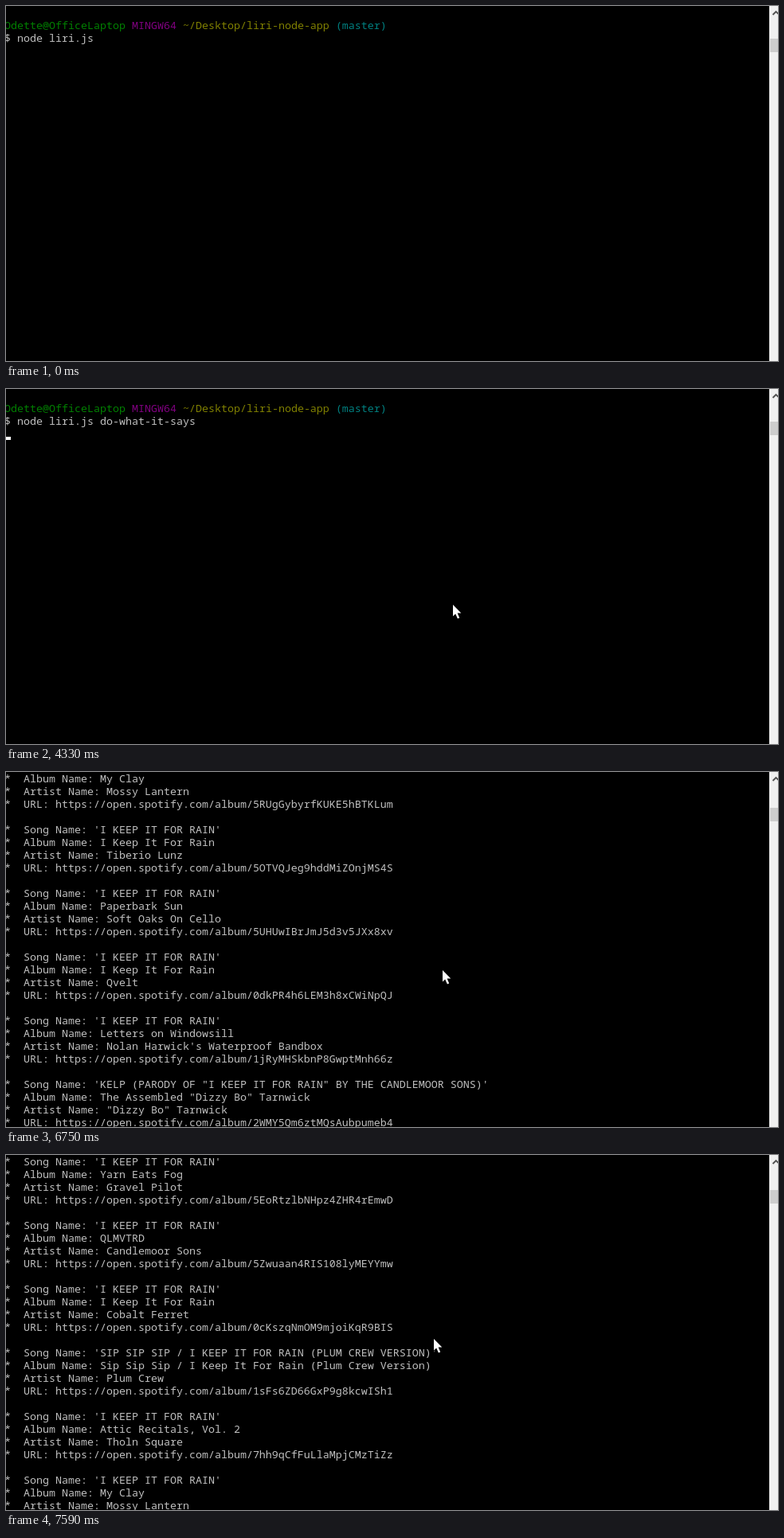
These frames come from a looping animation (969 by 446 pixels, 7990 ms). An HTML page:

```html
<!DOCTYPE html>
<html lang="en">
<head>
<meta charset="utf-8">
<title>Terminal search</title>
<style>
html, body { margin: 0; width: 100%; height: 100%; overflow: hidden; background: #000; }
#stage { position: relative; width: 969px; height: 446px; overflow: hidden; background: #000; }
#stage > * { position: absolute; }
pre {
  margin: 0; left: -2px; top: 0; color: #c0c0c0; white-space: pre;
  font: 13.333px/16px "Noto Sans Mono", "DejaVu Sans Mono", monospace;
  font-variant-ligatures: none;
}
.user { color: #008000; }
.sys { color: #800080; }
.path { color: #808000; }
.branch { color: #008080; }
.end { display: inline-block; height: 16px; color: #00f; background: #c0c0c0; }
#caret { left: -2px; top: 12px; width: 8px; height: 4px; background: #fff; }
#bar { left: 958px; top: 0; width: 11px; height: 446px; background: #f0f0f0; }
#thumb { left: 959px; top: 0; width: 10px; height: 17px; background: #cdcdcd; }
#arrow { left: 958px; top: 0; }
#mouse { left: 0; top: 0; overflow: visible; }

#shell, #log, #arg, #caret, #thumb, #mouse { animation: 7990ms step-end infinite; }
#shell { animation-name: shell; }
#log { animation-name: log; }
#arg { animation-name: arg; }
#caret { animation-name: caret; }
#thumb { animation-name: thumb; }
#mouse { animation-name: mouse; }

@keyframes shell { 0% { opacity: 1 } 77.471%, 100% { opacity: 0 } }
@keyframes arg { 0% { opacity: 0 } 36.67%, 100% { opacity: 1 } }

@keyframes caret {
  0% { opacity: 0; transform: translate(120px, 32px) }
  21.026% { opacity: 1; transform: translate(120px, 32px) }
  27.909% { opacity: 0; transform: translate(120px, 32px) }
  34.918% { opacity: 1; transform: translate(120px, 32px) }
  36.67% { opacity: 1; transform: translate(240px, 32px) }
  40.55% { opacity: 0; transform: translate(0, 48px) }
  54.192% { opacity: 1; transform: translate(0, 48px) }
  60.826% { opacity: 0; transform: translate(0, 48px) }
  67.709% { opacity: 1; transform: translate(0, 48px) }
  73.842%, 100% { opacity: 0; transform: translate(0, 48px) }
}

@keyframes log {
  0% { opacity: 0; transform: none }
  77.471% { opacity: 1; transform: translateY(-368px) }
  78.598% { opacity: 1; transform: translateY(-448px) }
  82.352% { opacity: 1; transform: translateY(-416px) }
  88.36% { opacity: 1; transform: translateY(-384px) }
  89.236% { opacity: 1; transform: translateY(-336px) }
  93.116% { opacity: 1; transform: translateY(-240px) }
  94.117% { opacity: 1; transform: translateY(-128px) }
  94.993%, 100% { opacity: 1; transform: translateY(0) }
}

@keyframes thumb {
  0% { transform: translateY(41px) }
  77.471% { transform: translateY(44px) }
  78.598% { transform: translateY(45px) }
  93.116%, 100% { transform: translateY(44px) }
}

@keyframes mouse {
  0% { transform: translate(680px, 470px) }
  2.753% { transform: translate(663px, 435px) }
  3.754% { transform: translate(560px, 300px) }
  4.693% { transform: translate(400px, 170px) }
  5.632% { transform: translate(280px, 90px) }
  6.633% { transform: translate(190px, 55px) }
  7.571% { transform: translate(145px, 60px) }
  8.573% { transform: translate(132px, 90px) }
  9.511% { transform: translate(144px, 119px) }
  12.39% { transform: translate(150px, 132px) }
  13.391% { transform: translate(162px, 148px) }
  14.392% { transform: translate(175px, 165px) }
  16.395% { transform: translate(200px, 172px) }
  17.396% { transform: translate(290px, 200px) }
  18.272% { transform: translate(390px, 228px) }
  19.148% { transform: translate(470px, 250px) }
  20.15% { transform: translate(535px, 265px) }
  21.026% { transform: translate(561px, 271px) }
  84.48% { transform: translate(548px, 249px) }
  85.481%, 100% { transform: translate(537px, 231px) }
}
</style>
</head>
<body>
<div id="stage">
<pre id="shell">

<span class="user">Odette@OfficeLaptop</span> <span class="sys">MINGW64</span> <span class="path">~/Desktop/liri-node-app</span> <span class="branch">(master)</span>
$ node liri.js <span id="arg">do-what-it-says</span></pre>
<pre id="log"></pre>
<div id="caret"></div>
<div id="bar"></div>
<div id="thumb"></div>
<svg id="arrow" width="11" height="17"><path d="M4.5 11 8.5 7 12.5 11" fill="none" stroke="#505050" stroke-width="1.8"/></svg>
<svg id="mouse" width="12" height="19"><path d="M0 0V14.5L3.2 11.5 5.9 17.5 8.2 16.5 5.6 10.6H10.3Z" fill="#fff" stroke="#000" paint-order="stroke" stroke-width="2"/></svg>
</div>
<script>
const hit = 'I Keep It For Rain';
const medley = `Sip Sip Sip / ${hit} (Plum Crew Version)`;

// album, artist, album id, song (when it differs)
const results = [
  ['Yarn Eats Fog', 'Gravel Pilot', '5EoRtzlbNHpz4ZHR4rEmwD'],
  ['QLMVTRD', 'Candlemoor Sons', '5Zwuaan4RIS108lyMEYYmw'],
  [hit, 'Cobalt Ferret', '0cKszqNmOM9mjoiKqR9BIS'],
  [medley, 'Plum Crew', '1sFs6ZD66GxP9g8kcwISh1', medley],
  ['Attic Recitals, Vol. 2', 'Tholn Square', '7hh9qCfFuLlaMpjCMzTiZz'],
  ['My Clay', 'Mossy Lantern', '5RUgGybyrfKUKE5hBTKLum'],
  [hit, 'Tiberio Lunz', '5OTVQJeg9hddMiZOnjMS4S'],
  ['Paperbark Sun', 'Soft Oaks On Cello', '5UHUwIBrJmJ5d3v5JXx8xv'],
  [hit, 'Qvelt', '0dkPR4h6LEM3h8xCWiNpQJ'],
  ['Letters on Windowsill', "Nolan Harwick's Waterproof Bandbox", '1jRyMHSkbnP8GwptMnh66z'],
  ['The Assembled "Dizzy Bo" Tarnwick', '"Dizzy Bo" Tarnwick', '2WMY5Qm6ztMQsAubpumeb4',
    `Kelp (Parody of "${hit}" by the Candlemoor Sons)`],
];

const entry = ([album, artist, id, song = hit]) => [
  `Song Name: '${song.toUpperCase()}'`,
  `Album Name: ${album}`,
  `Artist Name: ${artist}`,
  `URL: https://open.spotify.com/album/${id}`,
].map(line => `*  ${line}\n`).join('') + '\n';

const log = document.getElementById('log');
log.textContent = results.map(entry).join('');

const end = document.createElement('span');
const stars = '*'.repeat(10);
end.className = 'end';
end.textContent = ` ${stars} End of search ${stars} `;
log.append(end);
</script>
</body>
</html>
```
